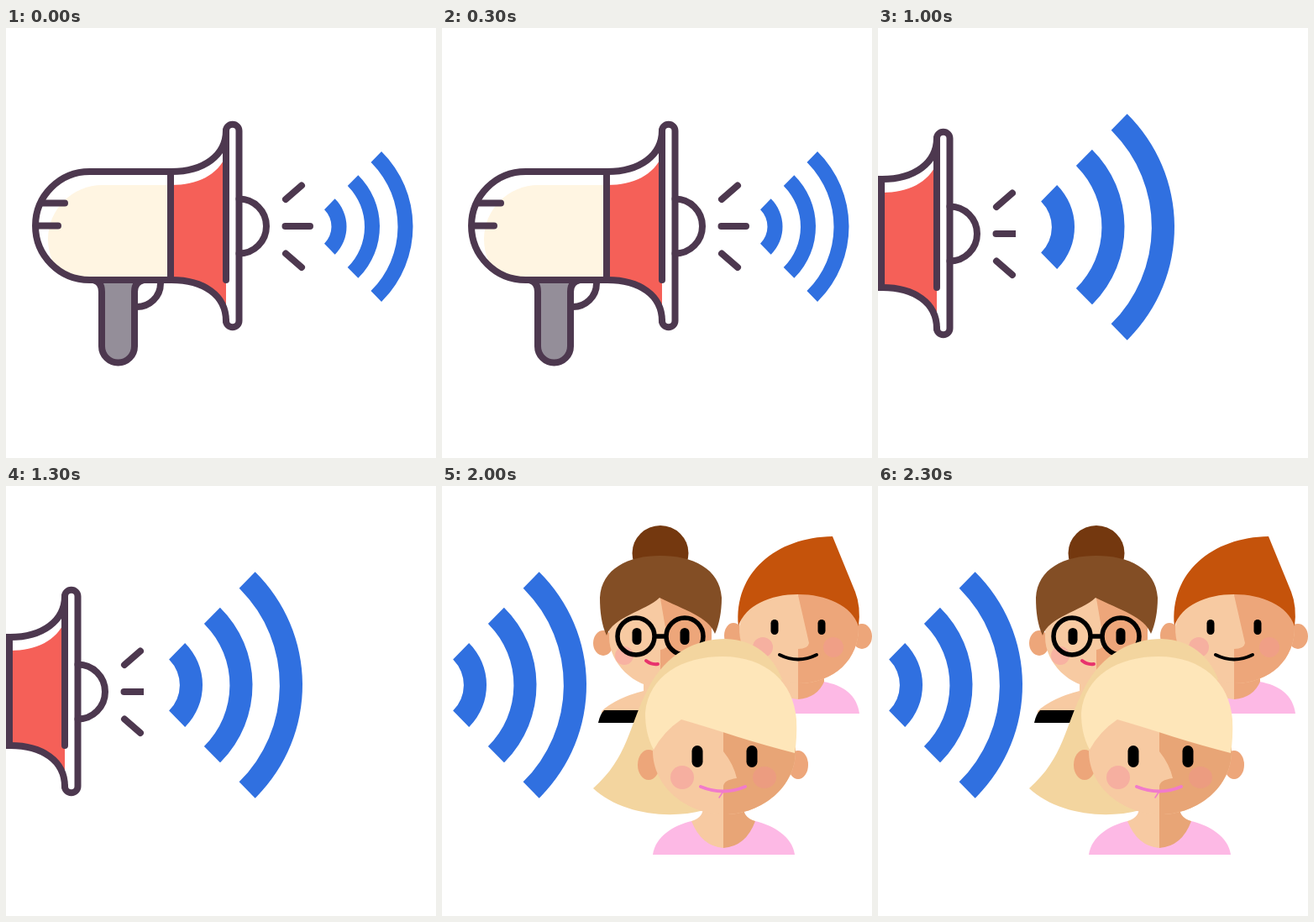
These frames come from a looping animation (512x512 px, 2500 ms). An HTML page with a canvas:

```html
<!DOCTYPE html>
<html lang="en">
<head>
<meta charset="utf-8">
<title>Announcement</title>
<style>
  html, body { margin: 0; width: 100%; height: 100%; overflow: hidden; background: #fff; }
  canvas { display: block; width: 100vw; height: 100vh; }
</style>
</head>
<body>
<canvas id="stage" width="512" height="512"></canvas>
<script>
const ctx = document.getElementById("stage").getContext("2d");
const INK = "#4d384f", BLUE = "#3070e0", BLACK = "#000";
const SKIN = "#f7caa2", SHADE = "#eda67a", TAN = "#e8a576", PINK = "#fdb9e5";

const STEP = 500;
const SCENES = [
  { horn: [0, 0], wave: [359, 236.5, 1] },
  { horn: [-98, 0], wave: [255.5, 237, 1.31] },
  { horn: [-192, 9], hornLimit: 164, wave: [164, 237, 1.506] },
  { wave: [63, 256, 1.506], people: [145, -6] },
  { wave: [-17, 237, 1.506], people: [0, 0] }
];

function fill(d, color) {
  ctx.fillStyle = color;
  ctx.fill(new Path2D(d));
}

function line(d, color, width) {
  ctx.strokeStyle = color;
  ctx.lineWidth = width;
  ctx.stroke(new Path2D(d));
}

function oval(x, y, rx, ry, color) {
  ctx.fillStyle = color;
  ctx.beginPath();
  ctx.ellipse(x, y, rx, ry, 0, 0, Math.PI * 2);
  ctx.fill();
}

function eye(x, y, w, h) {
  ctx.fillStyle = BLACK;
  ctx.beginPath();
  ctx.roundRect(x - w / 2, y - h / 2, w, h, w / 2);
  ctx.fill();
}

function clipped(d, draw) {
  ctx.save();
  ctx.clip(new Path2D(d));
  draw();
  ctx.restore();
}

function at([x, y], draw) {
  ctx.save();
  ctx.translate(x, y);
  draw();
  ctx.restore();
}

function drawWaves([x, y, scale]) {
  const spread = 0.793;
  ctx.fillStyle = BLUE;
  for (const radius of [46.5, 86, 125.5]) {
    ctx.beginPath();
    ctx.arc(x, y, radius * scale, -spread, spread);
    ctx.arc(x, y, (radius - 18) * scale, spread, -spread, true);
    ctx.fill();
  }
}

function drawHorn() {
  const barrel = "M197 171H99.5A64.5 64.5 0 0 0 99.5 300H197Z";
  const bell = "M197 171C235 171 262 152 262 122V350C262 318 235 300 197 300Z";
  const handle = "M104 300Q114 302 114 314V379A19.5 19.5 0 0 0 153 379V314Q153 302 164 300";
  const stroke = d => line(d, INK, 8);

  clipped(barrel, () => fill("M200 187H114.5A64.5 64.5 0 0 0 114.5 316H200Z", "#fff5e2"));
  clipped(bell, () => fill("M197 187C228 187 252 175 262 152V350H197Z", "#f56058"));

  stroke("M184 304A28 28 0 0 1 155 332");
  fill(handle, "#948e99");
  stroke(handle);

  stroke("M262 122C262 152 235 171 197 171H99.5A64.5 64.5 0 0 0 99.5 300H197C235 300 262 318 262 349");
  stroke("M196 171V300M42 208.5H70M38 235.5H62");
  stroke("M262 300V122.5A7.7 7.7 0 0 1 277.5 122.5V348.5A7.7 7.7 0 0 1 262 348.5");
  stroke("M277.5 203.5A32.3 32.3 0 0 1 277.5 268.5");
  stroke("M333 204L352 187.5M332.5 236H362M333 268.5L352 285");
}

function drawBunWoman() {
  fill("M190 268Q208 252 240 244V230H310V282H190Z", SKIN);
  fill("M186 282Q188 272 193 267H310V282Z", BLACK);
  oval(260, 80, 33.5, 33, "#74380f");
  oval(192, 187, 12, 15, SHADE);

  const face = "M199 125H321V180C321 211 291 240 260 240S199 211 199 180Z";
  fill(face, SKIN);
  clipped(face, () => {
    fill("M260 125H325V242H260V195Q269 194 269 186L260 134Z", SHADE);
    oval(217, 202, 11, 11, "#f8b2a2");
  });
  fill("M196 178C190 165 188 150 188 133C190 98 222 83 260 83S331 98 333 133C333 150 330 165 325 176C318 156 287 147 259 133C242 149 203 156 196 178Z", "#834e25");

  line("M243 208Q249 213 257 212", "#e8336d", 4);
  eye(232, 179, 11, 20);
  eye(289, 179, 11, 20);
  line("M253 179H267M209 179a22 22 0 1 0 44 0a22 22 0 1 0-44 0M267 179a22 22 0 1 0 44 0a22 22 0 1 0-44 0", BLACK, 5.5);
}

function drawMan() {
  fill("M351 271C353 246 374 235 394 233H454C478 237 494 249 497 271Z", PINK);
  fill("M394 228H424V254Q400 252 394 233Z", SKIN);
  fill("M424 228H455V233Q447 252 424 254Z", SHADE);
  oval(347, 178, 11, 15, SHADE);
  oval(500, 179, 12, 15, SHADE);

  const face = "M354 167C360 138 392 120 424 120S490 138 496 167C497 206 467 235 424 235S353 206 354 167Z";
  fill(face, SKIN);
  clipped(face, () => {
    fill("M424 115H500V240H424V194Q436 194 437 187L424 130Z", SHADE);
    oval(382, 192, 12, 12, "#f6b0a0");
    oval(466, 192, 12, 12, "#f09f86");
  });
  fill("M353 167C347 103 398 61 465 60L492 126Q499 144 496 167C488 142 457 129 424 129S361 142 353 167Z", "#c5530b");

  eye(396, 168, 9, 18);
  eye(452, 168, 9, 18);
  line("M402 201Q424 212 446 201", BLACK, 4);
}

function drawBlondeWoman() {
  fill("M180 360C222 323 222 286 246 240C267 199 303 182 338 182C372 183 394 202 405 230L312 386C267 398 211 389 180 360Z", "#f3d59f");

  fill("M251 439C254 417 276 404 297 399H373C394 404 417 417 420 439Z", PINK);
  fill("M297 399Q312 395 311 380H335V431Q309 429 297 399Z", SKIN);
  fill("M335 380H359Q358 395 373 399Q362 429 335 431Z", TAN);
  oval(246, 332, 13, 18, SHADE);
  oval(424, 332, 12, 17, SHADE);

  const face = "M251 270H421V316C421 357 382 391 336 391S251 357 251 316Z";
  fill(face, SKIN);
  clipped(face, () => {
    fill("M335 270H424V394H335V358Q335 350 351 348Q347 331 335 316Z", TAN);
    oval(286, 347, 14, 14, "#f6afa0");
    oval(384, 347, 14, 13, "#ec9c80");
  });
  fill("M252 314C244 299 242 284 242 270C246 226 286 203 334 203C386 203 419 234 422 278Q423 300 420 318C375 307 327 290 285 278Q264 292 252 314Z", "#fee6b9");

  eye(304, 322, 13, 26);
  eye(369, 322, 13, 26);
  line("M308 358Q335 369 361 358", "#f17bcb", 4);
  line("M334 365L330 371", "#f17bcb", 1.5);
}

function drawScene({ horn, hornLimit = 512, wave, people }) {
  ctx.fillStyle = "#fff";
  ctx.fillRect(0, 0, 512, 512);
  ctx.lineCap = ctx.lineJoin = "round";
  if (horn) clipped(`M0 0H${hornLimit}V512H0Z`, () => at(horn, drawHorn));
  if (people) at(people, () => {
    drawBunWoman();
    drawMan();
    drawBlondeWoman();
  });
  drawWaves(wave);
}

const start = performance.now();
function tick(now) {
  const elapsed = Math.max(0, now - start);
  drawScene(SCENES[Math.floor(elapsed / STEP) % SCENES.length]);
  requestAnimationFrame(tick);
}
tick(start);
</script>
</body>
</html>
```
